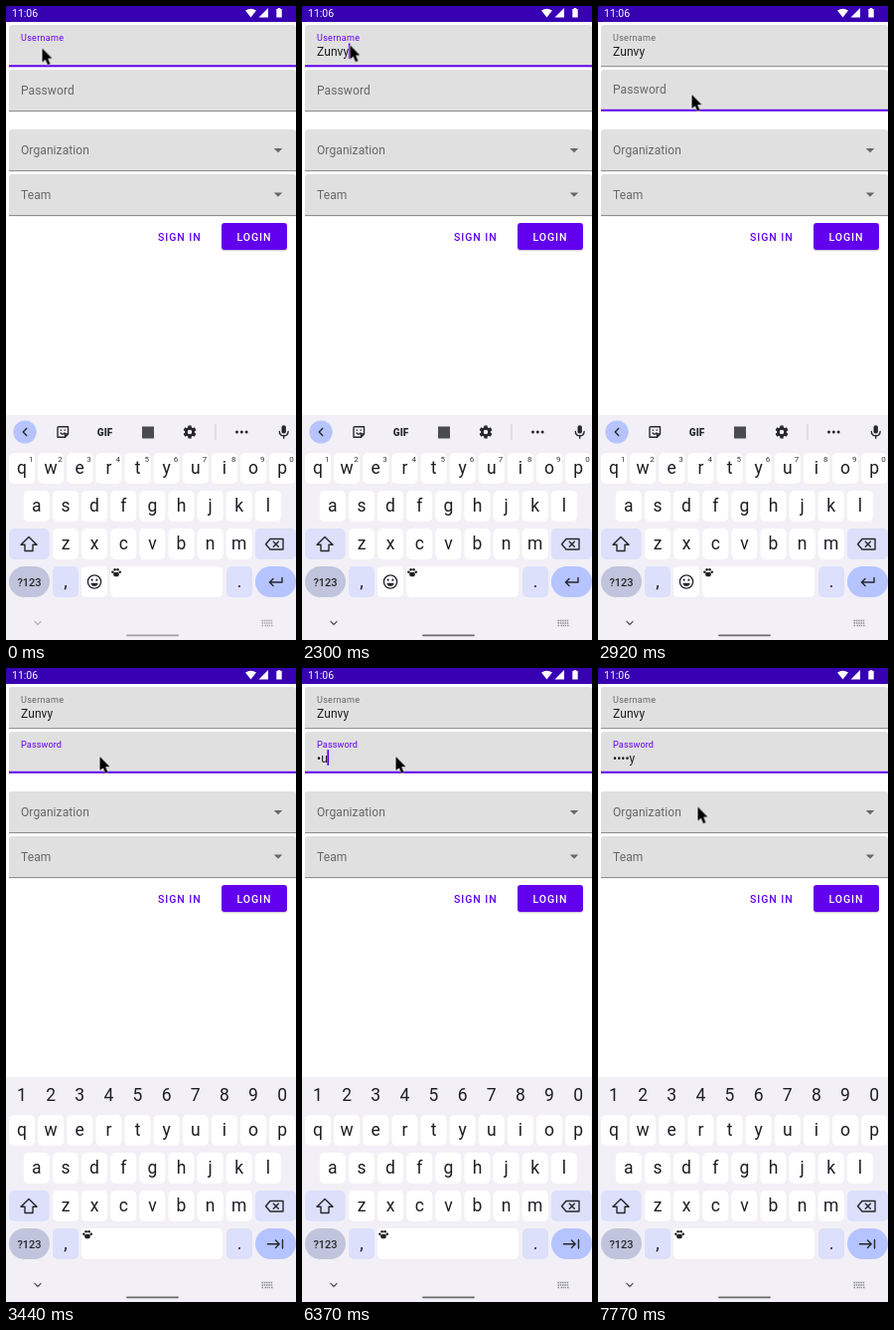
An HTML page for the animation above (8000 ms loop, 292 by 637 pixels).

```html
<!DOCTYPE html>
<html lang="en">
<head>
<meta charset="utf-8">
<title>Login form</title>
<style>
  html, body { margin: 0; width: 100%; height: 100%; overflow: hidden; background: #fff; }
  svg { display: block; width: 100vw; height: 100vh; }
  text { font-family: Roboto, Inter, sans-serif; }
  .mid { text-anchor: middle; }
  .label { font-size: 12px; letter-spacing: .1px; fill: #666; }
  .small { font-size: 9px; letter-spacing: .3px; fill: #6200ee; }
  .value { font-size: 12px; letter-spacing: .1px; fill: #1c1c1c; }
  .button { font-size: 10.5px; font-weight: 500; letter-spacing: .94px; }
  .key { font-size: 17.5px; fill: #1d1e22; }
  .hint { font-size: 8px; fill: #33343a; }
  .icon { fill: none; stroke: #26272b; stroke-width: 1.4; stroke-linejoin: round; stroke-linecap: round; }

  .before, .after, .user-label, #passLabel, #mouse, .chev, .pill, .dots {
    animation: 8s step-end infinite;
  }
  .before { animation-name: before; }
  .after { animation-name: after; }
  .keys.before { animation-name: keysBefore; }
  .keys.after { animation-name: keysAfter; }
  .user-label { animation-name: blur; }
  #passLabel { animation-name: rise; animation-timing-function: linear; }
  #mouse { animation-name: mouse; animation-timing-function: linear; }
  .chev { animation-name: chev; }
  .pill { animation-name: pill; }
  .dots { animation-name: dots; }

  @keyframes before { 0% { visibility: visible } 36.44%, 100% { visibility: hidden } }
  @keyframes after { 0% { visibility: hidden } 36.44%, 100% { visibility: visible } }
  @keyframes keysBefore { 0% { visibility: visible } 37%, 100% { visibility: hidden } }
  @keyframes keysAfter { 0% { visibility: hidden } 37%, 100% { visibility: visible } }
  @keyframes blur { 0% { fill: #6200ee } 36.44%, 100% { fill: #666 } }
  @keyframes rise {
    0% { transform: translate(15px, 88.5px) scale(1); fill: #666 }
    36.44% { transform: translate(15px, 88.5px) scale(1); fill: #666; animation-timing-function: ease-in-out }
    38.5%, 100% { transform: translate(15px, 80px) scale(.765); fill: #6200ee }
  }
  @keyframes mouse {
    0%, 27.625% { transform: translate(36.5px, 42.5px) }
    28.4% { transform: translate(43px, 36px) }
    32.25% { transform: translate(100.5px, 71.5px) }
    33% { transform: translate(106px, 80px) }
    34% { transform: translate(94.5px, 89px) }
    92.875% { transform: translate(94.5px, 89px); animation-timing-function: ease-in-out }
    97.125%, 100% { transform: translate(100.5px, 139.5px) }
  }
  @keyframes chev { 0% { opacity: .4 } 1% { opacity: .55 } 3.125% { opacity: .75 } 5.5% { opacity: .9 } 9.25%, 100% { opacity: 1 } }
  @keyframes pill { 0% { opacity: .6 } 3.125% { opacity: .8 } 5.5%, 100% { opacity: 1 } }
  @keyframes dots { 0% { opacity: .75 } 5.5%, 100% { opacity: 1 } }
</style>
</head>
<body>
<svg viewBox="0 0 292 637" preserveAspectRatio="none">
  <!-- status bar -->
  <rect width="292" height="16" fill="#3700b3"/>
  <text x="6" y="11" font-size="10.5" fill="#fff">11:06</text>
  <g fill="#fff">
    <path d="M241 4.6Q246.500 .8 252 4.600L246.500 11.500Z"/>
    <path d="M264 2V11.500H254.500Z"/>
    <path d="M272.300 3H273.700V2H276.300V3H277.700V11.500H272.300Z"/>
  </g>

  <!-- form -->
  <g id="fields"></g>
  <rect class="before" x="3" y="59.3" width="289" height="2" fill="#6200ee"/>
  <rect class="after" x="3" y="60.2" width="289" height="1" fill="#858585"/>
  <rect class="before" x="3" y="105.100" width="289" height="1" fill="#858585"/>
  <rect class="after" x="3" y="103.800" width="289" height="2" fill="#6200ee"/>
  <text class="small user-label" x="15" y="35">Username</text>
  <text class="label" id="passLabel">Password</text>
  <text class="label" x="15" y="148.500">Organization</text>
  <text class="label" x="15" y="193.500">Team</text>
  <path d="M269.800 143H278.200L274 147.200ZM269.800 187.500H278.200L274 191.700Z" fill="#666"/>
  <text class="value" id="user" x="15" y="50"></text>
  <text class="value" id="pass" x="15" y="94.700"></text>
  <rect id="caret" width="1.700" height="15.600" fill="#6200ee"/>

  <text class="button" x="153" y="235.700" fill="#6200ee">SIGN IN</text>
  <rect x="217" y="219.200" width="66" height="27" rx="3" fill="#000" opacity=".18"/>
  <rect x="217" y="218" width="66" height="27" rx="3" fill="#6200ee"/>
  <text class="button" x="232.500" y="235.700" fill="#fff">LOGIN</text>

  <!-- keyboard -->
  <rect y="411" width="292" height="226" fill="#f2f0f6"/>
  <g id="keys"></g>
  <g class="keys before" id="plain"></g>
  <g class="keys after" id="secret"></g>

  <g class="keys before">
    <circle cx="19" cy="428" r="11.600" fill="#b5c4ff"/>
    <path class="icon" d="M20.700 424.500L17.200 428L20.700 431.500"/>
    <path class="icon" d="M53 422.800H62.500V430L59.500 433.200H52V423.800Q52 422.800 53 422.800M62.500 430H59.500V433M55 429Q57 431.200 59 429M55.300 426V426.200M59.200 426V426.200"/>
    <text class="mid" x="99.500" y="431.600" font-size="10" font-weight="900" fill="#26272b">GIF</text>
    <rect x="137" y="422.500" width="12" height="12" fill="#4a4b50"/>
    <g fill="#26272b">
      <g id="gear"></g>
      <circle cx="232.500" cy="428" r="1.500"/><circle cx="237.300" cy="428" r="1.500"/><circle cx="242.100" cy="428" r="1.500"/>
      <rect x="277.500" y="421.300" width="4.400" height="8.300" rx="2.200"/>
    </g>
    <path d="M211 420V436" stroke="#c9c9d0"/>
    <path class="icon" d="M275.300 427.500Q275.500 431.800 279.700 431.800Q283.900 431.800 284.100 427.500M279.700 432V434.300"/>
  </g>

  <!-- key icons -->
  <path class="icon" d="M23 533.500L31 541.300H27V547.500H19V541.300H15Z"/>
  <path class="icon" d="M266 535.500H279V546H266L261.500 540.750ZM269.300 538.300L274.300 543.300M274.300 538.300L269.300 543.300"/>
  <path class="icon keys before" d="M278 574.500V579H265.500M269 575.400L265.400 579L269 582.600"/>
  <path class="icon keys after" d="M263.500 578.700H275M271.500 575L275.200 578.700L271.500 582.400M278.500 574.500V583"/>
  <g class="keys before">
    <circle class="icon" cx="89" cy="578.500" r="6.600"/>
    <circle cx="86.600" cy="576.700" r="1.100" fill="#26272b"/><circle cx="91.400" cy="576.700" r="1.100" fill="#26272b"/>
    <path d="M85.300 579.800H92.700Q91.800 583 89 583Q86.200 583 85.300 579.800Z" fill="#26272b"/>
  </g>

  <!-- navigation bar -->
  <path class="icon chev" d="M29 618.500L32 621.500L35 618.500" style="stroke:#55565a;stroke-width:1.200"/>
  <rect class="pill" x="121" y="631.400" width="53" height="1.900" rx=".95" fill="#6b6b70"/>
  <path class="dots" d="M257.500 617.500H269M257.500 620H269M257.500 622.500H259.500M260.500 622.500H266M267 622.500H269" stroke="#88898f" stroke-width="1.300" stroke-dasharray="1.500 .8"/>

  <path id="mouse" d="M0 0V14L3.200 11.200L5.600 16.700L8 15.700L5.700 10.300H10Z" fill="#000" stroke="#fff" stroke-width="1" stroke-linejoin="round" paint-order="stroke"/>
</svg>
<script>
const $ = id => document.getElementById(id);
const add = (id, markup) => { $(id).innerHTML += markup; };

const box = (x, y, w, fill, rx = 5, h = 31) =>
  `<rect x="${x}" y="${y}" width="${w}" height="${h}" rx="${rx}" fill="${fill}"/>`;
const label = (x, y, s, cls = 'key') => `<text class="mid ${cls}" x="${x}" y="${y}">${s}</text>`;

// Filled fields, rounded at the top only
[19, 64, 124, 169].forEach((y, i) => {
  add('fields', `<path d="M3 ${y + 42}V${y + 3}q0-3 3-3H289q3 0 3 3V${y + 42}Z" fill="#e0e0e0"/>`);
  if (i > 1) add('fields', box(3, y + 41.1, 289, '#858585', 0, 1));
});

// Letter rows
const pitch = 29.13;
[['qwertyuiop', 16], ['asdfghjkl', 30.8], ['zxcvbnm', 60]].forEach(([row, x0], r) => {
  const y = 449 + r * 38;
  [...row].forEach((c, i) => {
    const x = x0 + i * pitch;
    add('keys', box(x - 13, y, 26, '#fff') + label(x, y + 21, c));
    if (r === 0) {
      const digit = (i + 1) % 10;
      add('plain', label(x + 9.3, 457.7, digit, 'hint'));
      add('secret', label(x, 435, digit));
    }
  });
});

// Function keys
const tint = '#dce0fb';
add('keys',
  box(3, 525, 40.5, tint) + box(251, 525, 41, tint) +
  box(3, 563, 41, '#c0c4dc', 15.5) + box(47, 563, 26, tint) +
  box(222, 563, 26, tint) + box(251, 563, 41, '#b5c4ff', 15.5) +
  '<text class="mid" x="23.500" y="582.700" font-size="11" font-weight="500" fill="#26272b">?123</text>' +
  label(60, 584, ',') + label(235, 584, '.'));

const paw = x => `<g fill="#222" transform="translate(${x} 569)">
  <ellipse cx="0" cy="2" rx="2.900" ry="2.300"/><circle cx="-3.600" cy="-.3" r="1.300"/>
  <circle cx="-1.400" cy="-2.700" r="1.300"/><circle cx="1.500" cy="-2.700" r="1.300"/><circle cx="3.700" cy="-.3" r="1.300"/></g>`;
add('plain', box(76, 563, 26, '#fff') + box(105, 563, 113, '#fff') + paw(111));
add('secret', box(76, 563, 142, '#fff') + paw(82));

for (let a = 0; a < 360; a += 60)
  add('gear', `<rect x="183.300" y="421.500" width="3.400" height="4" rx=".6" transform="rotate(${a} 185 428)"/>`);
add('gear', '<circle cx="185" cy="428" r="3.600" fill="none" stroke="#26272b" stroke-width="2.600"/>');

// Typing: [time, field, visible letters, caret shown]; a secret keeps its last letter readable
const name = 'Zunvy';
const dots = n => '•'.repeat(n);
const masked = n => dots(n - 1) + name[n - 1];
const typed = n => name.slice(0, n);
const steps = [
  [0, 'user', '', 0], [80, 'user', '', 1], [570, 'user', '', 0],
  [910, 'user', typed(1), 1], [1200, 'user', typed(2), 1], [1350, 'user', typed(3), 1],
  [1530, 'user', typed(4), 1], [2030, 'user', typed(4), 0],
  [2210, 'user', name, 1], [2710, 'user', name, 0],
  [2940, 'pass', '', 1], [3440, 'pass', '', 0],
  [3790, 'pass', masked(1), 1], [4300, 'pass', masked(1), 0],
  [4500, 'pass', masked(2), 1], [4570, 'pass', masked(3), 1], [4640, 'pass', masked(4), 1],
  [5090, 'pass', dots(3), 1], [5270, 'pass', dots(2), 1], [5480, 'pass', dots(1), 1], [5950, 'pass', dots(1), 0],
  [6370, 'pass', masked(2), 1], [6690, 'pass', masked(3), 1], [6810, 'pass', masked(4), 1],
  [7100, 'pass', masked(5), 1], [7600, 'pass', masked(5), 0]
];

let start, shown;
function draw(now) {
  start ??= now;
  const t = (now - start) % 8000;
  const step = steps.findLast(s => s[0] <= t);
  if (step !== shown) {
    shown = step;
    const [, field, text, caret] = step;
    const inPass = field === 'pass';
    $('user').textContent = inPass ? name : text;
    $('pass').textContent = inPass ? text : '';
    const width = text ? $(field).getComputedTextLength() : 0;
    $('caret').setAttribute('x', 15 + width - (width ? .5 : 0));
    $('caret').setAttribute('y', inPass ? 82.2 : 37.5);
    $('caret').setAttribute('opacity', caret);
  }
  requestAnimationFrame(draw);
}
requestAnimationFrame(draw);
</script>
</body>
</html>
```
